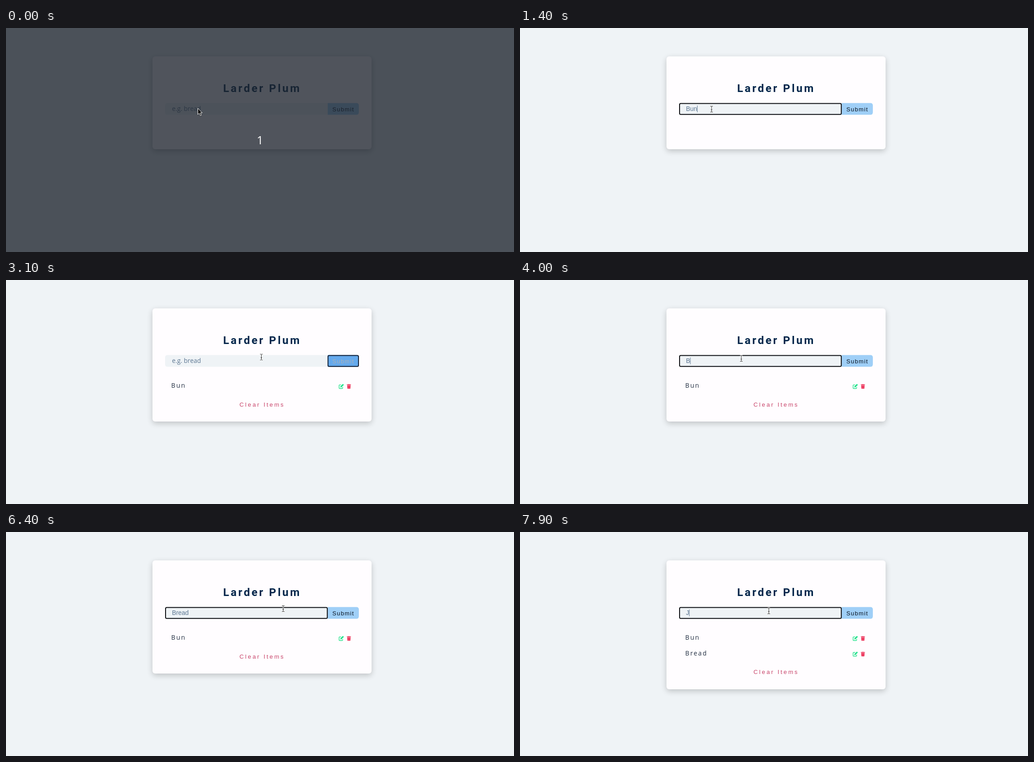
An HTML page that plays this animation: 1127x497 px, repeating every 8 s.

```html
<!DOCTYPE html>
<html lang="en">
<head>
<meta charset="utf-8">
<title>Shopping list</title>
<style>
  html, body { margin: 0; width: 100%; height: 100%; overflow: hidden; background: #eff3f6; }
  #card { position: absolute; left: 325px; top: 63px; width: 486px; background: #fffdff;
    border-radius: 6px; box-shadow: 0 4.3px 13px rgba(0, 0, 0, .2); }
  svg { position: absolute; left: 0; top: 0; }
  text { white-space: pre; }
  .mid { text-anchor: middle; }
  .title { font: bold 24.3px Roboto, sans-serif; letter-spacing: 3.6px; fill: #02254a; }
  .hint, .typed { font: 13.9px "Open Sans", sans-serif; fill: #5c7692; }
  .typed { font-family: "Liberation Sans", Arial, sans-serif; }
  .button { font: 13px "Liberation Sans", Arial, sans-serif; letter-spacing: 1.38px; }
  .clear { letter-spacing: 3.1px; fill: #c8446a; }
  .item { font: 14px "Open Sans", sans-serif; letter-spacing: 2.15px; fill: #222f42; }
  .count { font: 25.6px "Open Sans", sans-serif; fill: #fff; }
</style>
</head>
<body>
<div id="card"></div>
<svg width="1127" height="497" viewBox="0 0 1127 497">
  <defs>
    <g id="icons">
      <path d="M743.5 232.6H740Q739 232.6 739 233.6V239.8Q739 240.8 740 240.8H745.8Q746.8 240.8 746.8 239.8V237.6" fill="none" stroke="#24e28c" stroke-width="1.4"/>
      <path d="M741.8 238.2V236L746.8 231Q747.4 230.5 748 231L749 232Q749.5 232.6 749 233.2L744 238.2Z" fill="#24e28c"/>
      <path d="M756.2 231.6H758.8L759.4 231H762L762.6 231.6H765.2V233H756.2ZM756.8 233.6H764.6L764.1 240.4Q764 241.3 763.1 241.3H758.3Q757.4 241.3 757.3 240.4Z" fill="#ee4266"/>
    </g>
    <path id="beamShape" d="M-2.8-6.5H-.9L0-5.8L.9-6.5H2.8M0-5.8V5.8M-2.8 6.5H-.9L0 5.8L.9 6.5H2.8M-1.5 1.5H1.5"/>
  </defs>

  <g id="form">
    <text class="title mid" x="568.3" y="141.7">Larder Plum</text>
    <path d="M713.7 166.6H358.4Q352.9 166.6 352.9 172.1V187.1Q352.9 192.6 358.4 192.6H713.7Z" fill="#eff3f6"/>
    <path id="submit" d="M713.7 166.6H777.3Q782.8 166.6 782.8 172.1V187.1Q782.8 192.6 777.3 192.6H713.7Z"/>
    <text id="submitText" class="button mid" x="748.4" y="184.6">Submit</text>
    <rect id="ring" y="167.5" height="24.2" rx="2.5" fill="none" stroke-width="2"/>
    <text id="hint" class="hint" x="368.2" y="184">e.g. bread</text>
    <text id="typed" class="typed" x="368.2" y="184"></text>
    <rect id="caret" y="172" width="1" height="15" fill="#5c7692"/>
  </g>

  <g class="row"><text class="item" x="366.5" y="239.4">Bun</text><use href="#icons"/></g>
  <g class="row" transform="translate(0 34.7)"><text class="item" x="366.5" y="239.4">Bread</text><use href="#icons"/></g>
  <text id="clear" class="button clear mid" x="568.4">Clear Items</text>

  <g id="intro">
    <rect width="1127" height="497" fill="rgb(7,14,23)" opacity=".7"/>
    <text class="count mid" x="563.5" y="257.8">1</text>
  </g>

  <g id="cursor">
    <path id="arrow" d="M0 0V14L3.3 11.2L5.6 16.4L8 15.4L5.8 10.3H10Z" fill="#111" stroke="#fff" style="filter:drop-shadow(0 1px 1px rgba(0,0,0,.35))"/>
    <g id="beam" fill="none">
      <use href="#beamShape" stroke="#fff" stroke-width="2.6"/>
      <use href="#beamShape" stroke="#222"/>
    </g>
    <path id="hand" d="M-1.4 9V1.2Q0-.8 1.4 1.2V5.2L3.6 5.4L5.6 6L7.6 6.6Q8.8 7.2 8.6 9L7.2 15H.6L-3.9 9.6Q-4.4 7.6-2.8 7.7Z" fill="#fff" stroke="#111" stroke-linejoin="round"/>
  </g>
</svg>
<script>
const LOOP = 8000, STEP = 100, FADE = 300, INTRO_END = 400;
const el = id => document.getElementById(id);
const show = (node, on) => node.style.display = on ? "" : "none";
const clamp = v => Math.max(0, Math.min(1, v));
const mix = (a, b, p) => `rgb(${a.map((v, i) => Math.round(v + (b[i] - v) * p))})`;
const latest = (keys, t) => keys.findLast(k => k[0] <= t);

const INK = [11, 22, 36], WHITE = [255, 255, 255];
const focusKeys = [[0, ""], [400, "input"], [2700, "button"], [3500, "input"], [6800, "button"], [7500, "input"]];
const textKeys = [[0, ""], [1000, "B"], [1100, ""], [1200, "Bu"], [1400, "Bun"], [2700, ""],
  [4000, "B"], [4400, ""], [4800, "B"], [5100, "Br"], [5200, "Bre"], [5400, "Brea"], [5700, "Bread"],
  [6800, ""], [7900, "J"]];
const caretKeys = [[0, false], [400, true], [2200, false], [3500, true], [4600, false], [4800, true],
  [6300, false], [7500, true]];
const cursorKeys = [
  [0, "arrow", 425.5, 178], [400, "beam", 425, 180], [2000, "beam", 507, 188], [2200, "beam", 545, 190],
  [2400, "arrow", 680, 197], [2500, "arrow", 738, 198], [2600, "hand", 746, 184], [2700, "hand", 747, 180],
  [3000, "beam", 668, 173], [3100, "beam", 566.5, 171], [3200, "beam", 515, 172], [3300, "beam", 491, 174],
  [6200, "beam", 502, 171], [6300, "beam", 542, 168], [6400, "beam", 615, 170], [6500, "beam", 693, 175],
  [6600, "hand", 738, 180], [6700, "hand", 746, 180], [7100, "beam", 702, 186], [7200, "beam", 640, 182],
  [7300, "beam", 590, 178], [7400, "beam", 562, 176], [7500, "beam", 552, 175]];

const hover = (t, enter, leave) => Math.min(clamp((t - enter) / FADE), 1 - clamp((t - leave) / FADE));

function draw(time) {
  const t = Math.floor(time / STEP) * STEP;
  const items = t < 2700 ? 0 : t < 6800 ? 1 : 2;
  el("card").style.height = [206, 251, 286][items] + "px";
  document.querySelectorAll(".row").forEach((row, i) => show(row, i < items));
  show(el("clear"), items);
  el("clear").setAttribute("y", 280.5 + 34.7 * (items - 1));

  const heat = Math.max(hover(t, 2600, 3000), hover(t, 6600, 7100));
  el("submit").setAttribute("fill", mix([159, 207, 247], [72, 152, 232], heat));
  el("submitText").setAttribute("fill", mix(INK, WHITE, heat));

  const [since, focus] = latest(focusKeys, t), ring = el("ring"), onButton = focus === "button";
  show(ring, focus);
  ring.setAttribute("x", onButton ? 714.4 : 354);
  ring.setAttribute("width", onButton ? 67.6 : 358.8);
  ring.setAttribute("stroke", onButton ? mix(WHITE, [18, 30, 50], clamp((t - since + 50) / FADE)) : "#0a0c10");

  const text = latest(textKeys, t)[1];
  el("typed").textContent = text;
  show(el("hint"), !text);
  show(el("caret"), latest(caretKeys, t)[1]);
  el("caret").setAttribute("x", 368.2 + (text ? el("typed").getComputedTextLength() : 0));

  const [, shape, x, y] = latest(cursorKeys, t);
  for (const id of ["arrow", "beam", "hand"]) show(el(id), id === shape);
  el("cursor").setAttribute("transform", `translate(${x} ${y})`);

  const intro = t < INTRO_END;
  show(el("intro"), intro);
  el("form").style.opacity = intro ? .75 : 1;
}

function tick() {
  draw(performance.now() % LOOP);
  requestAnimationFrame(tick);
}
tick();
</script>
</body>
</html>
```
